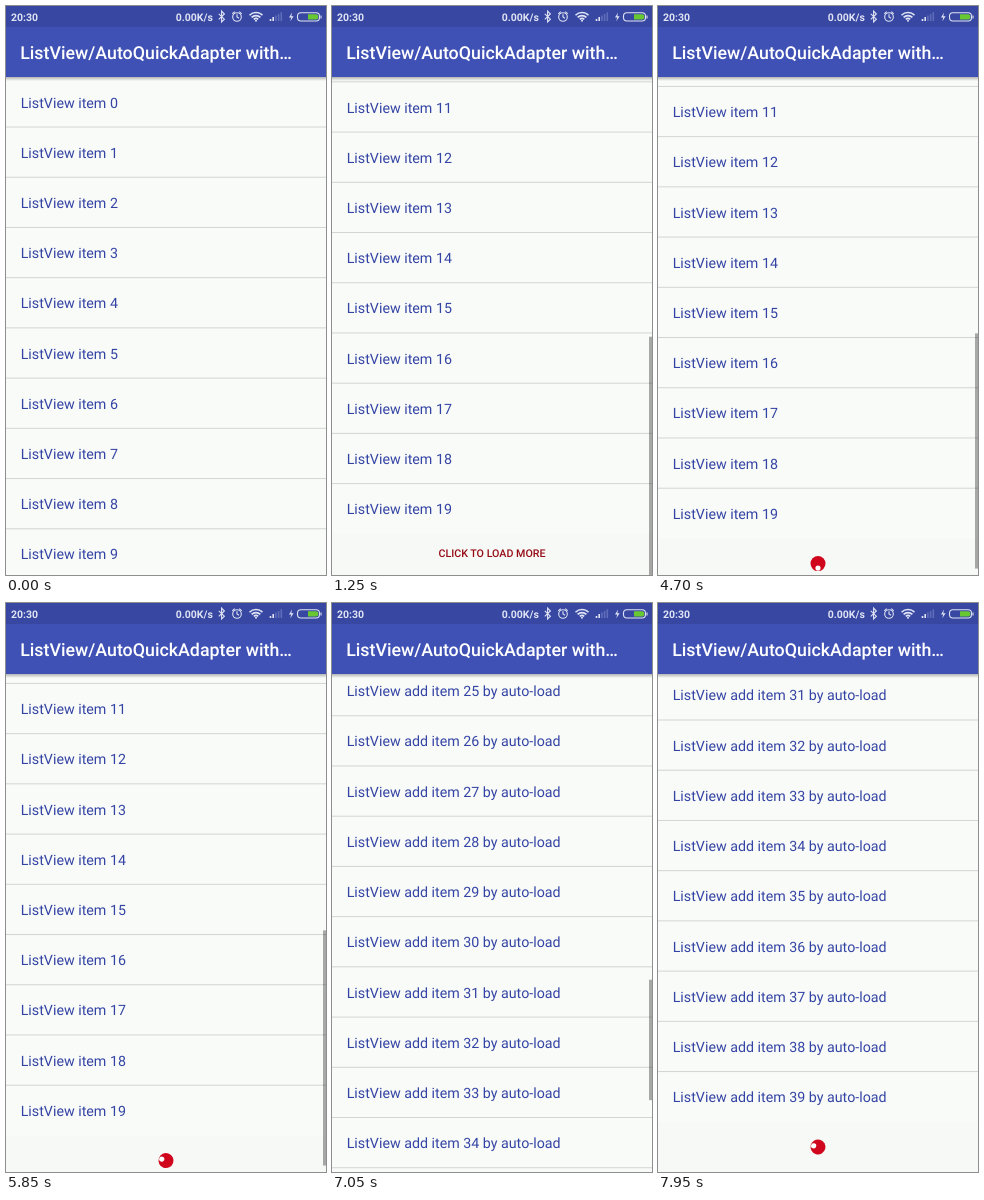
These frames come from a looping animation (320 px wide and 569 px high, 8 s). An HTML page:

```html
<!DOCTYPE html>
<html lang="en">
<head>
<meta charset="utf-8">
<title>List with load more</title>
<style>
  html, body { margin: 0; width: 100%; height: 100%; overflow: hidden; background: #f9fbf8; }
  svg { display: block; width: 100vw; height: 100vh; }
  text { font-family: Roboto, sans-serif; text-rendering: geometricPrecision; white-space: pre; }
  .row { font-size: 14.25px; fill: #3444a4; }
  .rule { fill: #d3d5d3; }
  .more { font-size: 10.7px; font-weight: 500; fill: #960b16; text-anchor: middle; }
  .title { font-size: 17.8px; font-weight: 500; fill: #fff; }
  .status { font-size: 10.5px; font-weight: 600; fill: #dfe3f4; }
  .icon { fill: none; stroke: #dfe3f4; stroke-width: 1.1; }
</style>
</head>
<body>
<svg viewBox="0 0 320 569" preserveAspectRatio="none">
  <defs>
    <linearGradient id="shade" x2="0" y2="1">
      <stop offset="0" stop-opacity=".28"/>
      <stop offset="1" stop-opacity="0"/>
    </linearGradient>
  </defs>
  <rect width="320" height="569" fill="#f9fbf8"/>
  <g id="list">
    <g id="footer">
      <rect width="320" height="90" fill="#f7f9f6"/>
      <text id="more" class="more" x="160" y="22.6">CLICK TO LOAD MORE</text>
      <g id="spinner">
        <circle r="7.5" fill="#d0061c"/>
        <circle cx="4.5" r="2.6" fill="#fff"/>
      </g>
    </g>
  </g>
  <rect id="bar" x="317" width="3" fill="#000" fill-opacity=".33"/>

  <rect y="71" width="320" height="4" fill="url(#shade)"/>
  <rect width="320" height="71" fill="#3f51b5"/>
  <rect width="320" height="21" fill="#3848a2"/>
  <text class="title" x="14.2" y="53.4">ListView/AutoQuickAdapter with…</text>

  <text class="status" x="5" y="14.7">20:30</text>
  <text class="status" x="169.7" y="14.7">0.00K/s</text>
  <g class="icon">
    <path d="M212.8 7.8l5.6 5.4-2.8 2.8V5.2l2.8 2.8-5.6 5.4"/>
    <circle cx="231" cy="11" r="4.3"/>
    <path d="M231 8.3V11l2 1.2M226.3 7.8l2.4-2.2M235.7 7.8l-2.4-2.2"/>
    <path d="M243.5 9.2a9.3 9.3 0 0 1 13 0M245.6 11.4a6.3 6.3 0 0 1 8.8 0M247.8 13.4a3.2 3.2 0 0 1 4.4 0" stroke-width="1.6"/>
    <rect x="291.5" y="6.8" width="22" height="8.2" rx="3.4"/>
    <path d="M315 9.4v3"/>
  </g>
  <circle cx="250" cy="14.8" r="1" fill="#dfe3f4"/>
  <path d="M264.5 15v-2M267.2 15v-4" stroke="#dfe3f4" stroke-width="1.6"/>
  <path d="M269.9 15V9.6M272.6 15V8M275.3 15V6.2" stroke="#5f6db9" stroke-width="1.6"/>
  <path d="M286 6.6l-3 4.8h2.2l-.9 3.8 3.3-5h-2.3z" fill="#dfe3f4"/>
  <path d="M302 8.3h8.2a2 2 0 0 1 2 2v1.2a2 2 0 0 1-2 2H302z" fill="#68c832"/>
</svg>
<script>
const $ = id => document.getElementById(id);
const LOOP = 8000, STEP = 50;
const TOP = 71, VIEW = 498, ROW = 50.22, FIRST = 20, ALL = 40;
const FOOT_TEXT = 36.4, FOOT_SPIN = 50;
const FLING1 = 950, CLICK = 2450, LOADED = 6300, FLING2 = 6750;
const TURN = 1650, PERIOD = 2250, SECOND_SPIN = 6780;
const END1 = FIRST * ROW + FOOT_TEXT - VIEW;
const END2 = ALL * ROW + FOOT_SPIN - VIEW;

const clamp = v => Math.max(0, Math.min(1, v));
const show = (el, on) => el.setAttribute("visibility", on ? "visible" : "hidden");

function add(name, attrs, text = "") {
  const el = document.createElementNS("http://www.w3.org/2000/svg", name);
  for (const key in attrs) el.setAttribute(key, attrs[key]);
  el.textContent = text;
  $("list").append(el);
  return el;
}

const added = [];
for (let i = 0; i < ALL; i++) {
  const label = i < FIRST ? `ListView item ${i}` : `ListView add item ${i} by auto-load`;
  const text = add("text", { class: "row", x: 14.7, y: i * ROW + 30.5 }, label);
  if (i >= FIRST) added.push(text);
  if (i === ALL - 1) continue;
  const rule = add("rect", { class: "rule", y: (i + 1) * ROW - 0.7, width: 320, height: 1 });
  if (i >= FIRST - 1) added.push(rule);
}

// steady glide to the end, then a small overshoot that dies away
function fling(age, from, to) {
  const speed = 2.756, lag = 38.4;
  const hit = lag + (to - from) / speed;
  if (age < hit) return from + speed * Math.max(0, age - lag);
  const past = age - hit;
  return to + 0.135 * past * Math.exp(-past / 100);
}

const scrollAt = t => t < FLING2
  ? fling(t - FLING1, 0, END1)
  : fling(t - FLING2, END1, END2);

function barAlpha(t) {
  if (t <= FLING1) return 0;
  if (t >= CLICK && t < FLING2) return 1;
  const age = t - (t < FLING2 ? FLING1 : FLING2);
  return 1 - clamp((age - 850) / 300);
}

function spinAngle(t) {
  const age = t < LOADED ? (t - CLICK) % PERIOD : t - SECOND_SPIN;
  return 90 - 360 * clamp(age / TURN);
}

function draw(t) {
  const loaded = t >= LOADED, spinning = t >= CLICK;
  const count = loaded ? ALL : FIRST;
  const total = count * ROW + (spinning ? FOOT_SPIN : FOOT_TEXT);
  const y = scrollAt(t);

  $("list").setAttribute("transform", `translate(0 ${TOP - y})`);
  added.forEach(el => show(el, loaded));
  $("footer").setAttribute("transform", `translate(0 ${count * ROW})`);
  show($("more"), !spinning);
  show($("spinner"), spinning);
  $("spinner").setAttribute("transform", `translate(160 25) rotate(${spinAngle(t)})`);

  const pos = Math.min(y, total - VIEW);
  $("bar").setAttribute("y", TOP + pos / total * VIEW);
  $("bar").setAttribute("height", VIEW * VIEW / total);
  $("bar").setAttribute("opacity", barAlpha(t));
}

const start = performance.now();
function tick() {
  const t = (performance.now() - start) % LOOP;
  draw(Math.floor(t / STEP) * STEP);
  requestAnimationFrame(tick);
}
tick();
</script>
</body>
</html>
```
